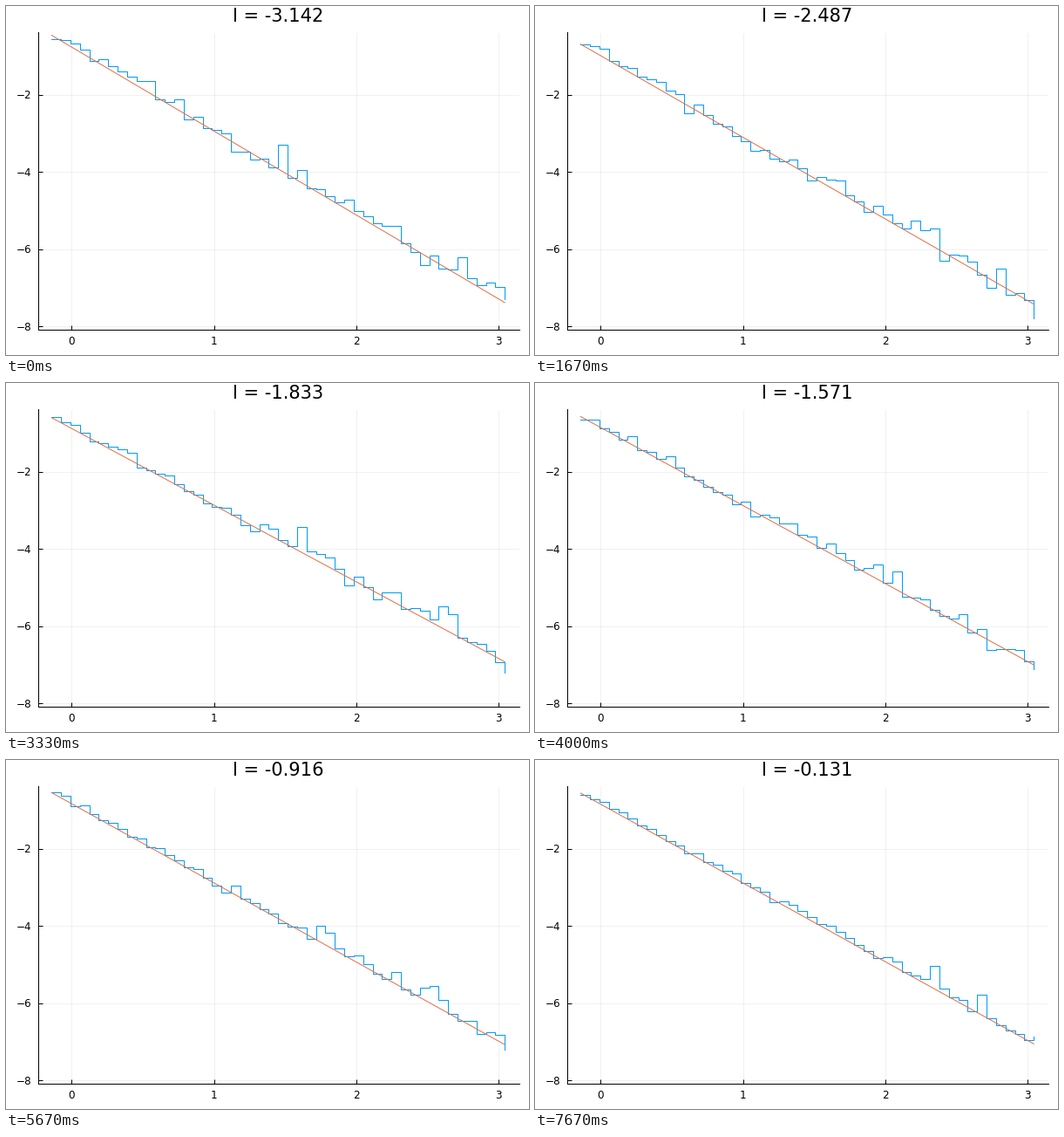
Write a matplotlib script that moves like this. It is 600x400 px and loops after 8 s.

```python
import numpy as np
import matplotlib.pyplot as plt
from matplotlib.animation import FuncAnimation

W, H, DPI = 600, 400, 100
LOOP_MS, STEPS, FRAMES = 8000, 24, 200
BINS = 49
PX = 72 / DPI  # one pixel in points

plt.rcParams["font.family"] = "DejaVu Sans"

# Plot area and data scale in pixels
LEFT, RIGHT, TOP, BOTTOM = 37, 588.5, 30.5, 371
X0, X_UNIT = 75.3, 163.37
Y0, Y_UNIT = 13.2, 44.27

x = np.linspace(-0.1405, 3.0415, BINS)
t = np.linspace(0, 1, BINS)


def trend(step):
    """Fitted line, drifting between a few key steps."""
    keys = [0, 5, 10, 14, 23]
    start = np.interp(step, keys, [-0.46, -0.69, -0.60, -0.54, -0.56])
    end = np.interp(step, keys, [-7.38, -7.42, -6.92, -7.08, -7.05])
    return start + (end - start) * t


def histogram(step):
    """Noisy bins around the trend: calmer over time, rougher to the right."""
    rng = np.random.default_rng(100 + step)
    calm = step / (STEPS - 1)
    spread = (0.15 - 0.09 * calm) * (0.6 + 0.8 * t)
    offset = rng.normal(0, 1, BINS) * spread
    spikes = rng.choice(np.arange(BINS // 2, BINS - 3), 3, replace=False)
    offset[spikes] += rng.uniform(0.25, 0.5, 3)
    offset[-1] -= 0.3 * (1 - calm)
    return trend(step) + offset


def to_px_x(value):
    return X0 + X_UNIT * value


def to_px_y(value):
    return Y0 - Y_UNIT * value


fig = plt.figure(figsize=(W / DPI, H / DPI), dpi=DPI, facecolor="white")


def label(px, py, text, size, ha):
    return fig.text(px / W, 1 - py / H, text, fontsize=size * PX,
                    ha=ha, va="baseline", color="black")


ax = fig.add_axes([LEFT / W, 1 - BOTTOM / H, (RIGHT - LEFT) / W, (BOTTOM - TOP) / H])
ax.set_xlim((LEFT - X0) / X_UNIT, (RIGHT - X0) / X_UNIT)
ax.set_ylim((Y0 - BOTTOM) / Y_UNIT, (Y0 - TOP) / Y_UNIT)
ax.set_xticks(range(4))
ax.set_yticks(range(-8, 0, 2))
ax.tick_params(direction="in", length=5 * PX, width=PX,
               labelbottom=False, labelleft=False)
ax.grid(color="black", alpha=0.055, linewidth=PX)
ax.set_axisbelow(True)
for side, spine in ax.spines.items():
    spine.set_visible(side in ("left", "bottom"))
    spine.set_linewidth(PX)

for value in range(4):
    label(to_px_x(value), 388, str(value), 12, "center")
for value in range(-8, 0, 2):
    label(29.7, to_px_y(value) + 4.6, f"\u2212{-value}", 12, "right")

title = label(312.2, 18, "", 21, "center")
steps_line, = ax.plot([], [], color="#009AFA", linewidth=PX, drawstyle="steps-post")
fit_line, = ax.plot([], [], color="#E26F46", linewidth=PX)


def update(frame):
    # The lead makes each step appear by its rounded 10 ms start time
    step = int((frame + 0.75) * STEPS / FRAMES)
    title.set_text(f"l = {-np.pi + step * np.pi / STEPS:.3f}")
    steps_line.set_data(x, histogram(step))
    fit_line.set_data(x, trend(step))
    return title, steps_line, fit_line


anim = FuncAnimation(fig, update, frames=FRAMES, interval=LOOP_MS // FRAMES,
                     repeat=True, repeat_delay=0, blit=False)
plt.show()
```
